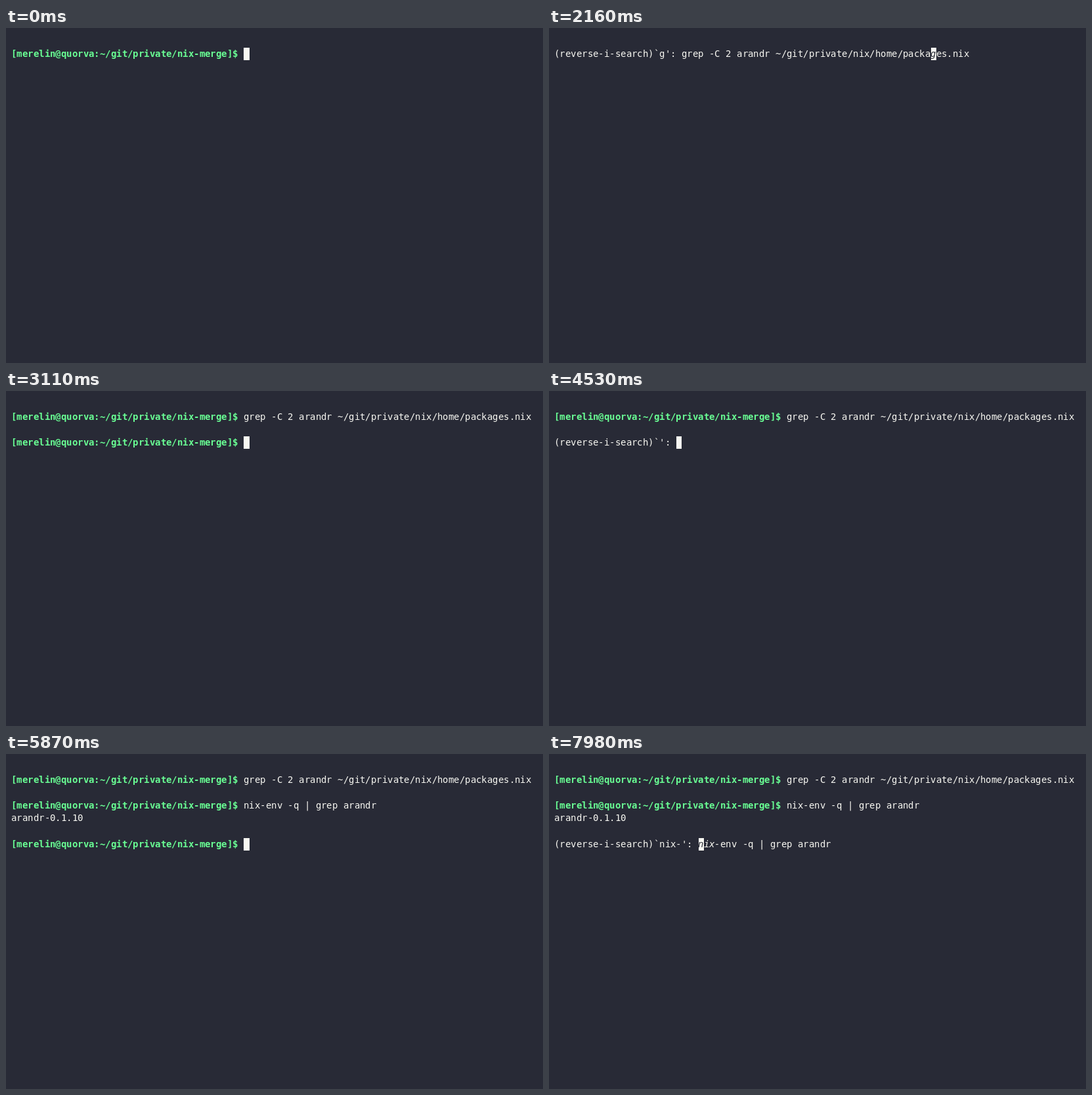
Recreate the animation shown at these times as an HTML page with a canvas. Size 818 px wide and 510 px high, loop 8000 ms.

```html
<!DOCTYPE html>
<html lang="en">
<head>
<meta charset="utf-8">
<title>Terminal</title>
<style>
  html, body { margin: 0; width: 100%; height: 100%; overflow: hidden; background: #282a36; }
  canvas { display: block; }
</style>
</head>
<body>
<canvas id="term" width="818" height="510"></canvas>
<script>
const ctx = document.getElementById('term').getContext('2d');
const BG = '#282a36', FG = '#f8f8f2', GREEN = '#69ff94';
const SIZE = 14, COL = SIZE * 0.60205, ROW = SIZE * 1.4, TOP = 10;
const LOOP = 8000;

const PROMPT = '[merelin@quorva:~/git/private/nix-merge]$ ';
const GREP = 'grep -C 2 arandr ~/git/private/nix/home/packages.nix';
const QUERY = 'nix-env -q | grep arandr';

const cellX = col => (col + 1) * COL;
const cellY = row => Math.round(TOP + row * ROW);

// Glyphs snap down to whole pixels, cursor edges to the nearest one.
function write(row, col, text, color = FG, style = '') {
  ctx.font = `${style} ${SIZE}px "DejaVu Sans Mono", monospace`;
  ctx.fillStyle = color;
  [...text].forEach((ch, i) => {
    if (ch !== ' ') ctx.fillText(ch, Math.floor(cellX(col + i)), cellY(row) + SIZE);
  });
}

function cursor(row, col, ch = ' ') {
  const x = Math.round(cellX(col)), y = cellY(row);
  ctx.fillStyle = FG;
  ctx.fillRect(x, y, Math.round(cellX(col + 1)) - x, cellY(row + 1) - y);
  write(row, col, ch, BG, 'italic');
}

// Prompt line: with a command it is finished, without one it waits for input.
function shell(row, command) {
  write(row, 0, PROMPT, GREEN, 'bold');
  if (command) write(row, PROMPT.length, command);
  else cursor(row, PROMPT.length);
}

// History search line, with the last match in italics and the cursor on it.
function search(row, term, command) {
  const label = `(reverse-i-search)\`${term}': `, col = label.length;
  write(row, 0, label);
  if (!term) return cursor(row, col);
  const at = command.lastIndexOf(term), end = at + term.length;
  write(row, col, command.slice(0, at));
  cursor(row, col + at, term[0]);
  write(row, col + at + 1, term.slice(1), FG, 'italic');
  write(row, col + end, command.slice(end));
}

// The part of a word typed so far, given the time of each key.
const typed = (word, keys, t) => word.slice(0, keys.filter(k => t >= k).length);

function draw(t) {
  ctx.fillStyle = BG;
  ctx.fillRect(0, 0, 818, 510);

  if (t < 500) return shell(1);
  if (t < 3110) return search(1, typed('grep', [2160, 2230, 2330, 2420], t), GREP);
  shell(1, GREP);

  if (t < 4530) return shell(3);
  if (t < 5820) {
    const term = typed('grep', [4740, 4800, 4870, 4930], t);
    return search(3, term, t < 5170 ? GREP : QUERY);
  }
  shell(3, QUERY);

  if (t < 5870) return cursor(4, 0);
  write(4, 0, 'arandr-0.1.10');
  if (t < 7350) return shell(6);
  search(6, typed('nix-', [7710, 7800, 7890, 7980], t), QUERY);
}

function tick() {
  draw(performance.now() % LOOP);
  requestAnimationFrame(tick);
}
tick();
</script>
</body>
</html>
```
